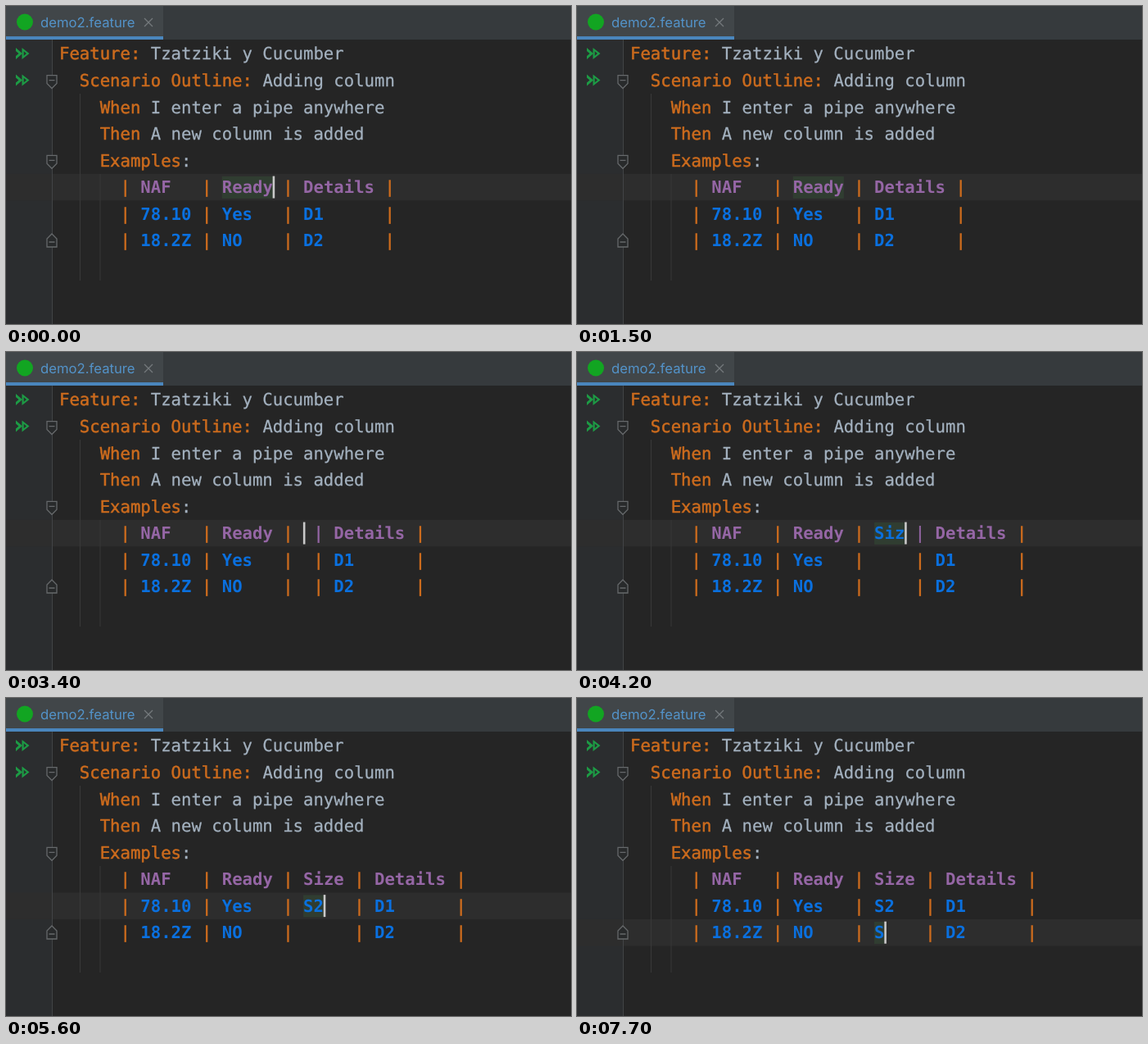
Write an HTML page that moves like this. It is 690 px wide and 388 px high and loops after 8000 ms.

```html
<!DOCTYPE html>
<html lang="en">
<head>
<meta charset="utf-8">
<title>Editor: adding a column</title>
<style>
  html, body { margin: 0; width: 100%; height: 100%; overflow: hidden; background: #252525; }
  svg { display: block; width: 690px; height: 388px; }
  text { white-space: pre; text-rendering: geometricPrecision; paint-order: stroke; }
  .code { font: 20.63px "DejaVu Sans Mono", "Liberation Mono", monospace; }
  .plain { fill: #a3b1bf; stroke: #a3b1bf; stroke-width: .25px; }
  .key { fill: #cc6b1d; stroke: #cc6b1d; stroke-width: .5px; }
  .pipe, .head, .cell { font-weight: bold; }
  .pipe { fill: #cc6b1d; }
  .head { fill: #9566a5; }
  .cell { fill: #0a70df; }
  .thin { fill: #9566a5; stroke: #9566a5; stroke-width: .4px; }
  .tab { font: 16.7px Inter, Roboto, sans-serif; fill: #5393c9; }
</style>
</head>
<body>
<svg viewBox="0 0 690 388">
  <rect width="690" height="388" fill="#252525"/>
  <rect y="41" width="57" height="347" fill="#2b2d2f"/>
  <rect id="line" width="690" height="32.5" fill="#2d2d2d"/>
  <path d="M56.5 41V388" stroke="#424446"/>
  <path d="M90.5 107V335M115 205V335" stroke="#393939"/>
  <rect width="690" height="41" fill="#363a3d"/>
  <rect width="192" height="38" fill="#414649"/>
  <rect y="37" width="192" height="4" fill="#4a86bd"/>
  <circle cx="23" cy="19.5" r="10" fill="#12a522"/>
  <text class="tab" x="42" y="26">demo2.feature</text>
  <path d="M169 15l10 10M179 15l-10 10" stroke="#74797c" stroke-width="1.3"/>
  <g id="gutter"></g>
  <g id="static"></g>
  <rect id="mark" height="27" fill="#303d31"/>
  <g id="table"></g>
  <rect id="caret" width="2.6" height="27" fill="#c9c9c9"/>
</svg>
<script>
const LEFT = 65, PITCH = 12.42, TOP = 58, LEADING = 32.57, LOOP = 8000;
const $ = id => document.getElementById(id);
const colX = col => LEFT + col * PITCH;
const rowY = row => TOP + row * LEADING;

const word = (row, col, cls, text) =>
  `<text class="code ${cls}" x="${colX(col)}" y="${rowY(row) + 7.4}">${text}</text>`;

const runIcon = row => `<g transform="translate(12 ${rowY(row)})" fill="#1d9b45">
  <path d="M0-7L8 0L0 7L0 3L3.5 0L0-3Z"/>
  <path fill-rule="evenodd" d="M7.5-7L16.5 0L7.5 7ZM9.7-2.7L13 0L9.7 2.7Z"/></g>`;

const foldIcon = (row, flip) => `<g transform="translate(56 ${rowY(row) + 1}) scale(1 ${flip})"
  fill="#282a2b" stroke="#66696b" stroke-width="1.3">
  <path d="M-6-7H6V3L0 9L-6 3ZM-3.5-1H3.5"/></g>`;

$('gutter').innerHTML = runIcon(0) + runIcon(1) +
  foldIcon(1, 1) + foldIcon(4, 1) + foldIcon(7, -1);

$('static').innerHTML = [
  [0, 0, 'key', 'Feature:'], [0, 9, 'plain', 'Tzatziki y Cucumber'],
  [1, 2, 'key', 'Scenario Outline:'], [1, 20, 'plain', 'Adding column'],
  [2, 4, 'key', 'When'], [2, 9, 'plain', 'I enter a pipe anywhere'],
  [3, 4, 'key', 'Then'], [3, 9, 'plain', 'A new column is added'],
  [4, 4, 'key', 'Examples'], [4, 12, 'plain', ':']
].map(args => word(...args)).join('');

const ROWS = [['NAF', 'Ready', 'Details'], ['78.10', 'Yes', 'D1'], ['18.2Z', 'NO', 'D2']];

// Each step overrides part of the state from its time on.
const STEPS = [
  { at: 0, cells: null, row: 0, col: 21, on: true, mark: [16, 5], parsed: false },
  { at: 200, on: false },
  { at: 700, on: true },
  { at: 1200, on: false },
  { at: 1600, cells: ['', '', ''], col: 24, on: true, mark: [0, 0] },
  { at: 2700, on: false },
  { at: 3200, on: true },
  { at: 3800, cells: ['S', '', ''], col: 25, mark: [24, 1] },
  { at: 4100, cells: ['Si', '', ''], col: 26, mark: [24, 2] },
  { at: 4200, cells: ['Siz', '', ''], col: 27, mark: [24, 3] },
  { at: 4400, cells: ['Size', '', ''], col: 28, mark: [24, 4] },
  { at: 4700, row: 1, col: 24, mark: [0, 0] },
  { at: 5200, cells: ['Size', 'S', ''], col: 25, mark: [24, 1], parsed: true },
  { at: 5500, cells: ['Size', 'S2', ''], col: 26, mark: [24, 2] },
  { at: 5900, row: 2, col: 24, mark: [0, 0] },
  { at: 6400, on: false },
  { at: 6900, on: true },
  { at: 7400, on: false },
  { at: 7500, cells: ['Size', 'S2', 'S'], col: 25, on: true, mark: [24, 1] }
];

function tableRow([first, second, last], i, { cells, parsed }) {
  const row = 5 + i, style = i ? 'cell' : 'head';
  const shift = cells ? 3 + cells[0].length : 0;
  const put = (col, cls, text) => word(row, col, cls, text);
  let out = [6, 14, 22, 32 + shift].map(col => put(col, 'pipe', '|')).join('') +
    put(8, style, first) + put(16, style, second) + put(24 + shift, style, last);
  if (cells) {
    out += put(22 + shift, i || parsed ? 'pipe' : 'thin', '|') +
      put(24, parsed ? style : 'cell', cells[i]);
  }
  return out;
}

function setBox(id, attrs) {
  for (const name in attrs) $(id).setAttribute(name, attrs[name]);
}

function draw(state) {
  const y = rowY(5 + state.row);
  $('table').innerHTML = ROWS.map((row, i) => tableRow(row, i, state)).join('');
  setBox('line', { y: y - 16 });
  setBox('mark', { x: colX(state.mark[0]), y: y - 13, width: state.mark[1] * PITCH });
  setBox('caret', { x: colX(state.col) - .2, y: y - 13.3, opacity: state.on ? 1 : 0 });
}

let shown = 0;
const start = performance.now();
function tick(now) {
  const time = Math.max(0, now - start) % LOOP;
  const count = STEPS.filter(step => step.at <= time).length;
  if (count !== shown) {
    shown = count;
    draw(Object.assign({}, ...STEPS.slice(0, count)));
  }
  requestAnimationFrame(tick);
}
tick(start);
</script>
</body>
</html>
```
